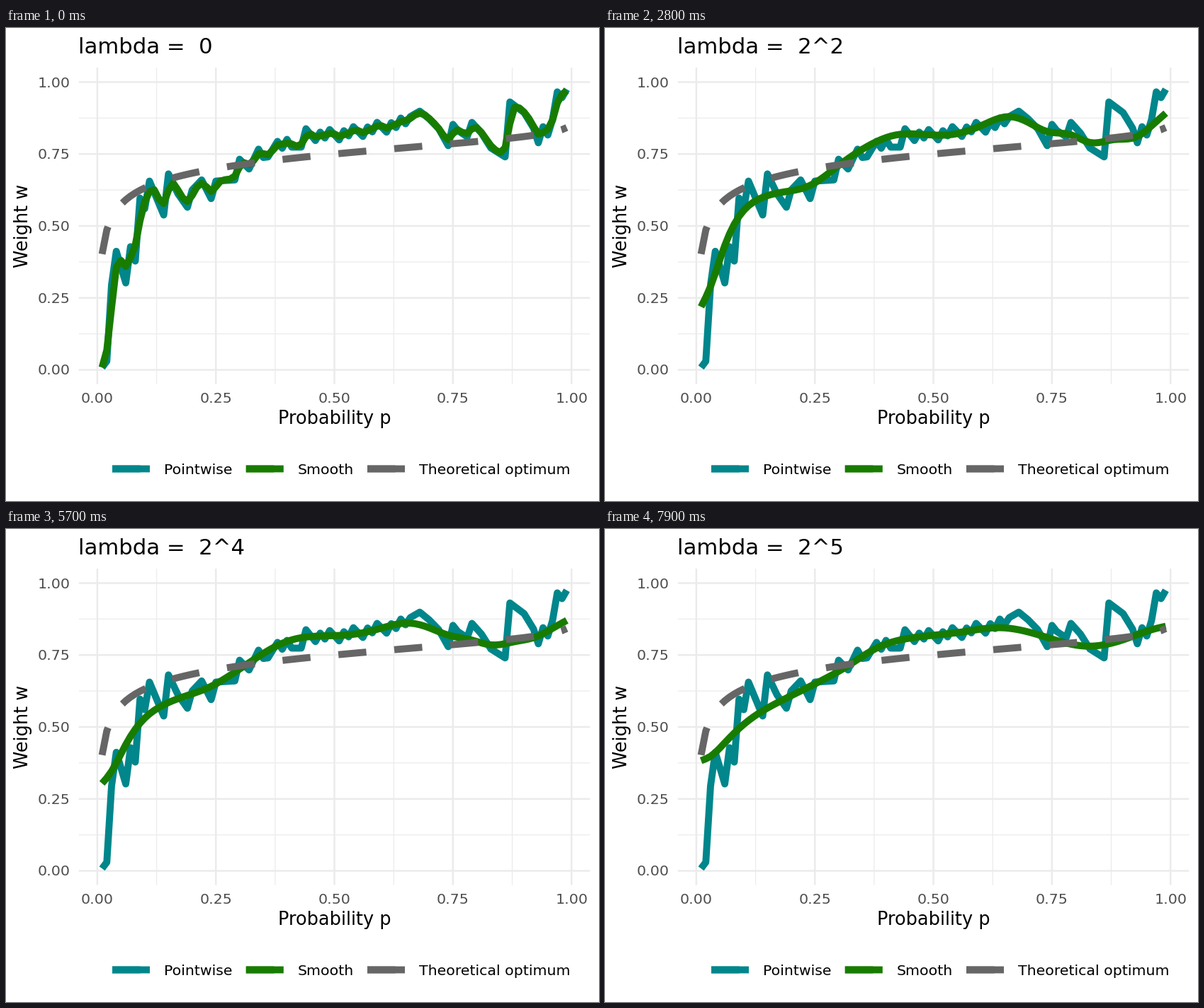
A matplotlib script for the animation above (8000 ms loop, 837 by 669 pixels).

```python
import math

import numpy as np
import matplotlib.pyplot as plt
from matplotlib.animation import FuncAnimation

plt.rcParams["font.family"] = "DejaVu Sans"
plt.rcParams["path.snap"] = False

W, H, DPI = 837, 669, 72          # at 72 dpi one point is one pixel
TEAL, GREEN, GREY = "#00868B", "#187C00", "#666666"
LINE = 9.9
BASE = 25.6                       # base font size
LEFT, RIGHT, TOP, BOTTOM = 102.9, 824.3, 56, 503.5

HOLD, TWEEN = 10, 7               # frames at rest, steps of a change
CYCLE = HOLD + TWEEN
FRAMES, STEP_MS = 80, 100
START = 12                        # the loop begins inside the first rest

percent = np.arange(1, 100)


def px(p):
    return 128.9 + 669.3 * p


def py(w):
    return 483.5 - 407 * w


def spline(points):
    """Natural cubic spline through the points, sampled at every percent."""
    x, y = np.array(points, float).T
    n, h = len(x), np.diff(x)
    slope = np.diff(y) / h
    a, b = np.eye(n), np.zeros(n)
    for i in range(1, n - 1):
        a[i, i - 1:i + 2] = h[i - 1], 2 * (h[i - 1] + h[i]), h[i]
        b[i] = 6 * (slope[i] - slope[i - 1])
    m = np.linalg.solve(a, b)
    k = np.clip(np.searchsorted(x, percent, side="right") - 1, 0, n - 2)
    u, v = percent - x[k], x[k + 1] - percent
    return ((m[k] * v**3 + m[k + 1] * u**3) / (6 * h[k])
            + (y[k] / h[k] - m[k] * h[k] / 6) * v
            + (y[k + 1] / h[k] - m[k + 1] * h[k] / 6) * u)


def blur(values, sigma, lag=0.3):
    """Gaussian average that trails its input slightly."""
    gap = percent[:, None] - lag - percent
    kernel = np.exp(-0.5 * (gap / sigma) ** 2)
    return kernel @ values / kernel.sum(axis=1)


def pointwise_weights():
    """Straight runs between turning points, with a sawtooth in the middle."""
    turns = [
        (1, .008), (2, .03), (3, .295), (4, .412), (6, .302), (7, .428),
        (8, .378), (9, .597), (10, .56), (11, .656), (14, .538), (15, .681),
        (17, .612), (19, .565), (20, .625), (22, .66), (24, .595),
        (25, .656), (29, .66), (30, .732), (32, .698), (34, .767),
        (35, .738), (36, .74), (38, .794), (39, .77), (40, .801),
        (41, .774), (43, .774), (65, .855), (66, .88), (68, .899),
        (70, .872), (72, .838), (74, .779), (75, .853), (76, .832),
        (78, .81), (79, .86), (81, .823), (83, .771), (86, .74),
        (87, .931), (90, .894), (92, .84), (93, .789), (94, .845),
        (95, .816), (96, .87), (97, .966), (98, .946), (99, .975)]
    runs = np.interp(percent, *zip(*turns))
    crest = np.interp(percent, [44, 49, 54, 64], [.838, .835, .845, .875])
    teeth = crest - 0.05 * ((percent - 44) / 2.5 % 1)
    return np.where((percent >= 44) & (percent <= 64), teeth, runs)


def optimum_weights():
    """Weight that mixes N(-1, 1) and N(3, 4) quantiles into N(0, 1)."""
    grid_z = np.linspace(-4, 4, 4001)
    cdf = [0.5 * (1 + math.erf(z / math.sqrt(2))) for z in grid_z]
    z = np.interp(percent / 100, cdf, grid_z)
    return (3 + z) / (4 + z)


pointwise = pointwise_weights()
medium = spline([
    (1, .219), (3, .29), (6, .432), (9, .533), (13, .592), (18, .617),
    (24, .641), (30, .71), (36, .776), (42, .816), (48, .818), (54, .818),
    (60, .848), (66, .88), (70, .86), (74, .828), (79, .817), (83, .79),
    (88, .8), (93, .811), (96, .848), (99, .892)])
strong = spline([
    (1, .383), (3, .398), (6, .445), (10, .509), (18, .592), (26, .658),
    (32, .713), (38, .774), (46, .811), (56, .83), (64, .845), (72, .821),
    (82, .781), (90, .803), (96, .838), (99, .85)])


def smooth_weights(k):
    """Little smoothing keeps detail; more of it nears the strong curve."""
    detail = pointwise - medium
    if k == 0:
        return medium + blur(detail, 0.8)
    if k == 1:
        return medium + 0.6 * blur(detail, 2)
    t = (k - 2) / 3
    return medium + t * (1.4 - 0.4 * t) * (strong - medium)


states = [py(smooth_weights(k)) for k in range(6)]

fig = plt.figure(figsize=(W / DPI, H / DPI), dpi=DPI, facecolor="white")
ax = fig.add_axes([0, 0, 1, 1])
ax.set_xlim(0, W)
ax.set_ylim(H, 0)
ax.axis("off")


def text(x, y, s, size=0.8, color="black", ha="left", **kw):
    return ax.text(x, y, s, fontsize=BASE * size, color=color, ha=ha,
                   va="baseline", rotation_mode="anchor", **kw)


def curve(x, y, color, dashed=False):
    style = (0, (4, 4)) if dashed else "-"
    return ax.plot(x, y, color=color, lw=LINE, ls=style,
                   solid_capstyle="butt", dash_capstyle="butt",
                   solid_joinstyle="round", dash_joinstyle="round")[0]


def grid(values, width):
    for v in values:
        for x, y in (([px(v)] * 2, [TOP, BOTTOM]),
                     ([LEFT, RIGHT], [py(v)] * 2)):
            ax.plot(x, y, color="#EBEBEB", lw=width, solid_capstyle="butt")


ticks = np.arange(5) / 4
grid(ticks[:-1] + 0.125, 1.24)
grid(ticks, 2.47)
for v in ticks:
    text(px(v), 530, f"{v:.2f}", color="#4D4D4D", ha="center")
    text(90.3, py(v) + 7, f"{v:.2f}", color="#4D4D4D", ha="right")

text(px(0.5), 560, "Probability p", 1, ha="center")
text(31, py(0.5), "Weight w", 1, ha="center", rotation=90)
title = text(102.3, 36, "", 1.2)

for key_x, label_x, color, label in ((150, 223, TEAL, "Pointwise"),
                                     (338.8, 411.4, GREEN, "Smooth"),
                                     (510, 582.7, GREY, "Theoretical optimum")):
    for dashed in (False, True):
        curve([key_x, key_x + 53], [623.5] * 2, color, dashed)
    text(label_x, 631, label)

xs = px(percent / 100)
curve(xs, py(pointwise), TEAL)
smooth_line = curve(xs, states[0], GREEN)
curve(xs, py(optimum_weights()), GREY, dashed=True)


def update(frame):
    k, step = divmod(frame + START, CYCLE)
    f = min((step + 1) / TWEEN, 1)
    before = states[max(k - 1, 0)]
    smooth_line.set_ydata(before + f * (states[k] - before))
    title.set_text("lambda =  " + (f"2^{k}" if k else "0"))
    return smooth_line, title


anim = FuncAnimation(fig, update, frames=FRAMES, interval=STEP_MS,
                     repeat=True, repeat_delay=0)
plt.show()
```
